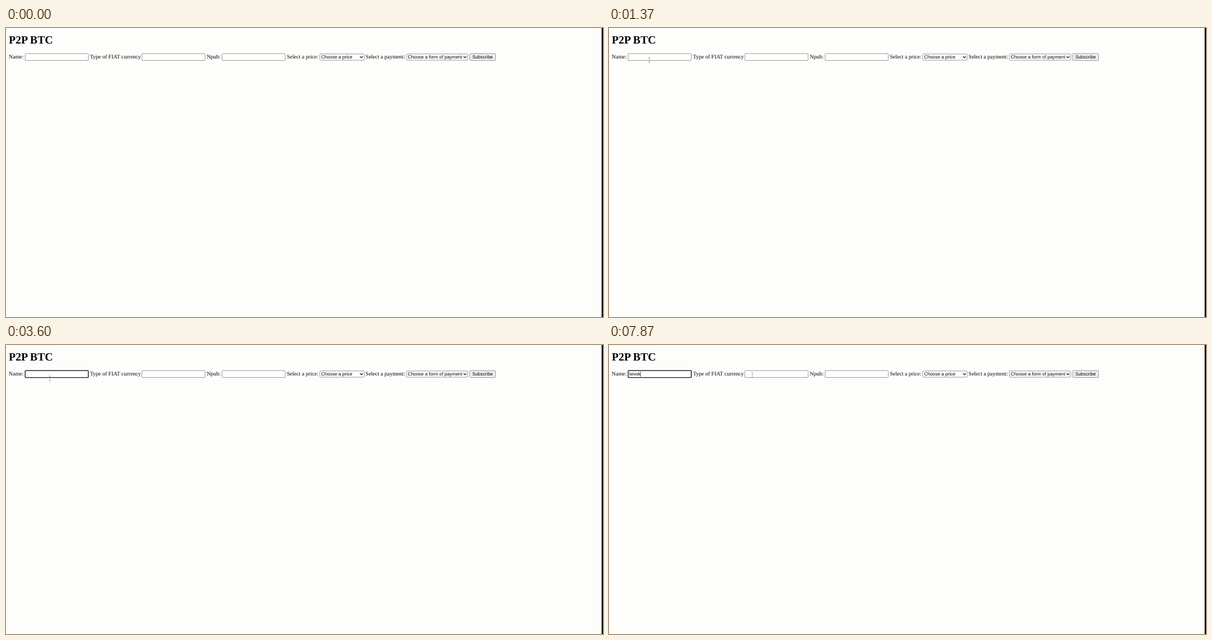
An HTML page for the animation above (8000 ms loop, 1075 by 521 pixels).

```html
<!DOCTYPE html>
<html lang="en">
<head>
<meta charset="utf-8">
<title>P2P BTC</title>
<style>
  html, body { margin: 0; width: 100%; height: 100%; overflow: hidden; background: #fdfdfb; }
  svg { display: block; width: 1075px; height: 521px; }
  text { text-rendering: geometricPrecision; font-kerning: normal; }
  .label { font: 10px "Liberation Serif", serif; }
  .title { font: bold 20px "Liberation Serif", serif; }
  .control { font: 8.33px "Liberation Sans", sans-serif; }
  .box { fill: #fefefd; stroke: #7c7c7c; stroke-width: .8; }
</style>
</head>
<body>
<svg viewBox="0 0 1075 521">
  <rect width="1075" height="521" fill="#fdfdfb"/>
  <rect x="1072.6" width="2.4" height="521"/>
  <text class="title" x="5" y="27.6">P2P BTC</text>
  <g id="form"></g>
  <rect id="focus" x="34.5" y="46.1" width="113.8" height="12.5" rx="1.4" fill="none" stroke="#141426" stroke-width="1.4"/>
  <text id="typed" class="control" x="36.6" y="55.2"></text>
  <rect id="caret" y="47.8" width=".7" height="9.4"/>
  <circle id="ripple" cx="72.5" cy="54.5" fill="none" stroke="#e02030" stroke-width="1.2"/>
  <path id="arrow" d="M0 0V9.6L2.3 7.5L3.9 11L5.5 10.3L4 6.9H7Z" stroke="#fff" stroke-width=".5"/>
  <path id="beam" d="M-2-4.7Q0-4.7 0-3.7Q0-4.7 2-4.7M0-3.7V3.7M-2 4.7Q0 4.7 0 3.7Q0 4.7 2 4.7" fill="none" stroke="#888" stroke-width=".7"/>
</svg>
<script>
const LOOP = 8000, CLICK = 1680, RIPPLE_END = 2100, BLINK = 500;
const $ = id => document.getElementById(id);

const label = (x, text) => `<text class="label" x="${x}" y="55.2">${text}</text>`;
const box = (x, width, y = 46.1, height = 12.5, fill = '') =>
  `<rect class="box" x="${x}" y="${y}" width="${width}" height="${height}" rx="1.4" style="fill:${fill}"/>`;
const caption = (x, text) => `<text class="control" x="${x}" y="55.2">${text}</text>`;
const select = (x, width, text) => box(x, width, 46.8, 11.2) + caption(x + 2.5, text) +
  `<path d="M${x + width - 7.6} 51.1l2.5 2.5l2.5-2.5" fill="none" stroke="#000" stroke-width="1.25"/>`;

$('form').innerHTML =
  label(5, 'Name:') + box(34.5, 113.8) +
  label(151.2, 'Type of FIAT currency') + box(244.7, 113.8) +
  label(361.5, 'Npub:') + box(389.1, 113.8) +
  label(505.8, 'Select a price:') + select(565.1, 80, 'Choose a price') +
  label(647.6, 'Select a payment:') + select(720.9, 110.7, 'Choose a form of payment') +
  box(835.1, 46.3, 46.1, 12.5, '#efefef') + caption(839.7, 'Subscribe');

// Each entry: time, field content; every edit restarts the caret blink.
const edits = [
  [CLICK, ''], [4500, 't'], [4720, 'te'], [4800, 'tev'], [4880, 'tevk'], [5230, 'tevko'],
  [6290, 'tev'], [6340, 't'], [6400, ''],
  [6700, 't'], [6930, 'te'], [7430, 'tev'], [7500, 'tevo'], [7570, 'tevok']
];

// Pointer waypoints: time, x, y.
const path = [
  [300, 150, 521], [720, 101.5, 148], [860, 101.5, 148], [1130, 72.5, 58],
  [1370, 72.5, 58], [1500, 72.5, 54], [2200, 72.5, 54], [3000, 79, 60.5],
  [3870, 79, 60.5], [4400, 86, 65.5], [5530, 86, 65.5], [5950, 258, 54.3], [LOOP, 258, 54.3]
];

function pointerAt(t) {
  const next = Math.max(1, path.findIndex(p => p[0] > t));
  const [t0, x0, y0] = path[next - 1], [t1, x1, y1] = path[next];
  const u = Math.max(0, (t - t0) / (t1 - t0)), ease = u * u * (3 - 2 * u);
  return [x0 + (x1 - x0) * ease, y0 + (y1 - y0) * ease];
}

const show = (id, visible) => $(id).setAttribute('visibility', visible ? 'visible' : 'hidden');

function draw(t) {
  const [x, y] = pointerAt(t);
  const overField = t >= 1080;
  for (const id of ['arrow', 'beam']) $(id).setAttribute('transform', `translate(${x} ${y})`);
  show('arrow', t >= 300 && !overField);
  show('beam', overField);

  const edit = edits.findLast(e => e[0] <= t);
  $('typed').textContent = edit ? edit[1] : '';
  show('focus', edit);
  show('caret', edit && Math.floor((t - edit[0]) / BLINK) % 2 === 0);
  $('caret').setAttribute('x', 36.6 + (edit && edit[1] ? $('typed').getComputedTextLength() : 0));

  const u = (t - CLICK) / (RIPPLE_END - CLICK);
  const active = u >= 0 && u < 1;
  show('ripple', active);
  if (active) {
    $('ripple').setAttribute('r', 25 * u);
    $('ripple').setAttribute('opacity', 1 - u);
  }
}

const start = performance.now();
function tick() {
  draw((performance.now() - start) % LOOP);
  requestAnimationFrame(tick);
}
tick();
</script>
</body>
</html>
```
